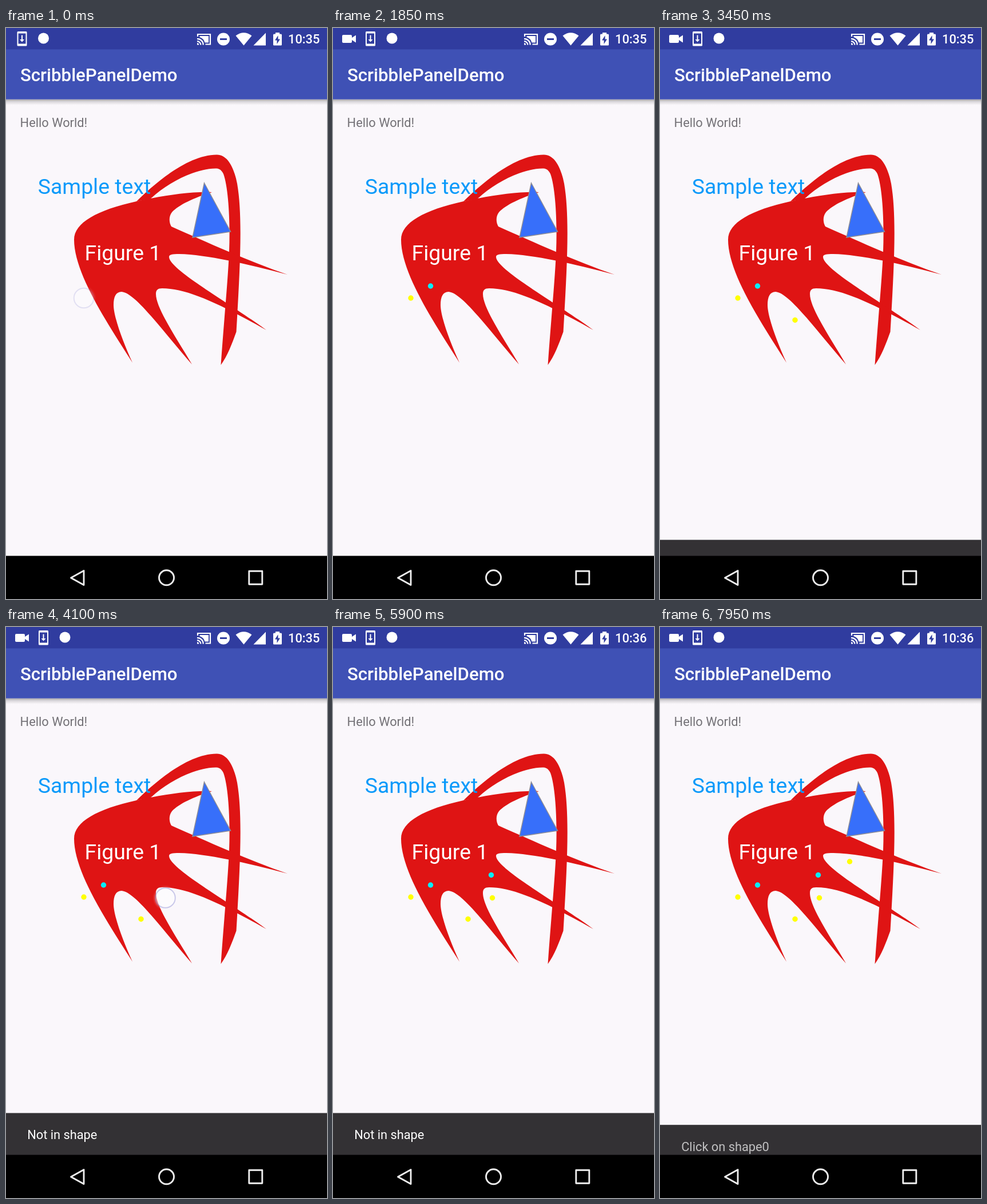
Recreate the animation shown at these times as an HTML page. Size 561 by 998 pixels, loop 8000 ms.

```html
<!DOCTYPE html>
<html lang="en">
<head>
<meta charset="utf-8">
<title>Shape touch demo</title>
<style>
  html, body { margin: 0; width: 100%; height: 100%; overflow: hidden; background: #faf7fb; }
  svg { display: block; width: 100%; height: 100%; font-family: Roboto, sans-serif; }
  text { white-space: pre; }
</style>
</head>
<body>
<svg viewBox="0 0 561 998" xmlns="http://www.w3.org/2000/svg">
  <defs>
    <linearGradient id="shade" x2="0" y2="1">
      <stop offset="0" stop-color="#000" stop-opacity=".32"/>
      <stop offset=".4" stop-color="#000" stop-opacity=".13"/>
      <stop offset="1" stop-color="#000" stop-opacity="0"/>
    </linearGradient>
    <radialGradient id="halo">
      <stop offset=".72" stop-color="#fff" stop-opacity=".3"/>
      <stop offset="1" stop-color="#fff" stop-opacity="0"/>
    </radialGradient>
  </defs>

  <rect width="561" height="998" fill="#faf7fb"/>
  <rect y="124.700" width="561" height="10" fill="url(#shade)"/>
  <rect y="37" width="561" height="87.700" fill="#3f51b5"/>
  <rect width="561" height="37.400" fill="#303c9f"/>
  <text x="24.900" y="93" font-size="31.2" font-weight="500" fill="#fff">ScribblePanelDemo</text>
  <text x="24.600" y="173" font-size="21.8" fill="#737176">Hello World!</text>

  <!-- status icons -->
  <g fill="#fff">
    <path id="camera" d="M18 12H31Q33 12 33 14V17L40 12.500V25.500L33 21V24Q33 26 31 26H18Q16 26 16 24V14Q16 12 18 12Z"/>
    <g id="notes">
      <path fill-rule="evenodd" d="M21 6H35Q36.500 6 36.500 7.500V30Q36.500 31.500 35 31.500H21Q19.500 31.500 19.500 30V7.500Q19.500 6 21 6ZM21.500 9.500V27.500H34.500V9.500Z"/>
      <path d="M27 12.500H29V20H32L28 24.500L24 20H27Z"/>
      <circle cx="65.500" cy="18" r="9.500"/>
    </g>
    <g fill="none" stroke="#fff" stroke-width="2.2">
      <path d="M335 15V11H357V28.500H348.500M334 18.800A10.500 10.500 0 0 1 344.700 29.500M334 23.200A6.300 6.300 0 0 1 340.300 29.500"/>
    </g>
    <path d="M334 26.300A3.200 3.200 0 0 1 337.200 29.500H334ZM338.500 14H354V25.500H347.500A14 14 0 0 0 338.500 16Z"/>
    <circle cx="380" cy="19.500" r="11"/>
    <path d="M401.500 13.500Q415.500 3 429.500 13.500L415.500 30.500Z"/>
    <path d="M432.500 30.500L454 8.500V30.500Z"/>
    <path d="M471 8H478V10.500H480.500Q482 10.500 482 12V29Q482 30.500 480.500 30.500H468.500Q467 30.500 467 29V12Q467 10.500 468.500 10.500H471Z"/>
  </g>
  <path d="M374 18H386V21H374ZM475.500 13L470 21.500H473.500V28L479 19.500H475.500Z" fill="#303c9f"/>
  <text id="clock" x="493" y="27" font-size="21.8" font-weight="500" fill="#fff"></text>

  <!-- sketch -->
  <g fill="#df1414">
    <path d="M228 303C270 262 322 222 368 221.500C388 221 399 246 404 272C414 330 409 420 402.500 531C395 552 387 573 375.500 589C381 510 388 440 390 390C392 340 389 280 380 255C376 247 372 245.500 366 245.500C330 246 283 270 252 299Z"/>
    <path d="M228 303C160 318 119 340 119 370C119 430 180 520 221 585C205 550 188 505 188 484C188 470 192 461 202 461C226 463 270 525 325 588C300 545 262 490 262 465C262 458 265 455 273 455C315 455 370 480 455 528C390 480 285 422 285 400C285 396 290 395 303 395C350 396 420 412 492 431C425 408 350 374 289 347C285 340 284 330 290 322C302 309 328 297 360 287C325 286 290 291 252 298Z"/>
  </g>
  <path d="M346.500 271L392.500 356L326 366Z" fill="#376ffa" stroke="#8b8b95" stroke-width="1.5"/>
  <text x="55.800" y="290" font-size="37.4" fill="#0a9afa">Sample text</text>
  <text x="137.500" y="406" font-size="37.4" fill="#fff">Figure 1</text>
  <g id="dots"></g>
  <g id="touch">
    <circle r="22" fill="url(#halo)"/>
    <circle r="17" fill="#fff" fill-opacity=".24"/>
    <circle r="17.300" fill="none" stroke="#8c8cd2" stroke-opacity=".45" stroke-width="2"/>
  </g>

  <g id="bar">
    <rect y="849.500" width="561" height="74" fill="#333134"/>
    <text id="note" x="37.200" y="895" font-size="21.8" fill="#fff"></text>
  </g>

  <rect y="922.600" width="561" height="76" fill="#000"/>
  <g fill="none" stroke="#eee" stroke-width="2.9" stroke-linejoin="round">
    <path d="M113.500 961L136 948.500V973.500Z"/>
    <circle cx="280.500" cy="960.800" r="13"/>
    <rect x="424.800" y="949.300" width="23" height="23"/>
  </g>
</svg>
<script>
const LOOP = 8000, STEP = 50, SLIDE = 250, FADE = 180, BAR = 73;
const MISS = ['Not in shape', '#ff0'], HIT = ['Click on shape0', '#0ef'];

// x, y, press, release, dot appears, bar enters, bar leaves, kind
const taps = [
  [136, 472, -300, -100, 150, 550, 1600, MISS],
  [170.500, 451, 1350, 1500, 1550, 1850, 3350, HIT],
  [236, 510.500, 2750, 2950, 2950, 3600, 4650, MISS],
  [278.500, 473.500, 4100, 4300, 4300, 4900, 6150, MISS],
  [276.500, 433.500, 5550, 5700, 5750, 6400, 7883, HIT],
  [331.500, 410, 7550, 7700, 7750, 9000, 9900, MISS]
];

const $ = id => document.getElementById(id);
const clamp = v => Math.min(1, Math.max(0, v));
const soft = v => .5 - Math.cos(Math.PI * clamp(v)) / 2;

// cubic-bezier(.4, 0, .2, 1)
function ease(x) {
  if (x <= 0 || x >= 1) return clamp(x);
  let lo = 0, hi = 1, s = .5;
  for (let i = 0; i < 24; i++) {
    s = (lo + hi) / 2;
    const u = 1 - s;
    if (1.2 * s * u * u + .6 * s * s * u + s * s * s < x) lo = s; else hi = s;
  }
  return s * s * (3 - 2 * s);
}

const dots = taps.map(([x, y, , , , , , kind]) => {
  const dot = document.createElementNS('http://www.w3.org/2000/svg', 'circle');
  const attrs = { cx: x, cy: y, r: 4.7, fill: kind[1] };
  for (const key in attrs) dot.setAttribute(key, attrs[key]);
  return $('dots').appendChild(dot);
});

function draw(t) {
  let glow = 0, shown = 0, ink = 0;
  taps.forEach(([x, y, press, release, mark, enter, leave, kind], i) => {
    dots[i].setAttribute('opacity', t >= mark ? 1 : 0);
    if (t >= press && t < release + 200) {
      glow = 1 - clamp((t - release) / 200);
      $('touch').setAttribute('transform', `translate(${x} ${y})`);
    }
    if (t >= enter && t < leave + SLIDE) {
      shown = ease((t - enter) / SLIDE) - ease((t - leave) / SLIDE);
      ink = soft((t - enter - SLIDE + FADE) / FADE) - soft((t - leave) / FADE);
      $('note').textContent = kind[0];
    }
  });
  $('touch').setAttribute('opacity', glow);
  $('bar').setAttribute('transform', `translate(0 ${(BAR + .5) * (1 - shown)})`);
  $('note').setAttribute('opacity', ink);

  const recording = t >= 550;
  $('camera').setAttribute('opacity', recording ? 1 : 0);
  $('notes').setAttribute('transform', `translate(${recording ? 37.5 : 0} 0)`);
  $('clock').textContent = t < 4500 ? '10:35' : '10:36';
}

const start = performance.now();
function tick() {
  const t = (performance.now() - start) % LOOP;
  draw(Math.floor(t / STEP) * STEP);
  requestAnimationFrame(tick);
}
tick();
</script>
</body>
</html>
```
